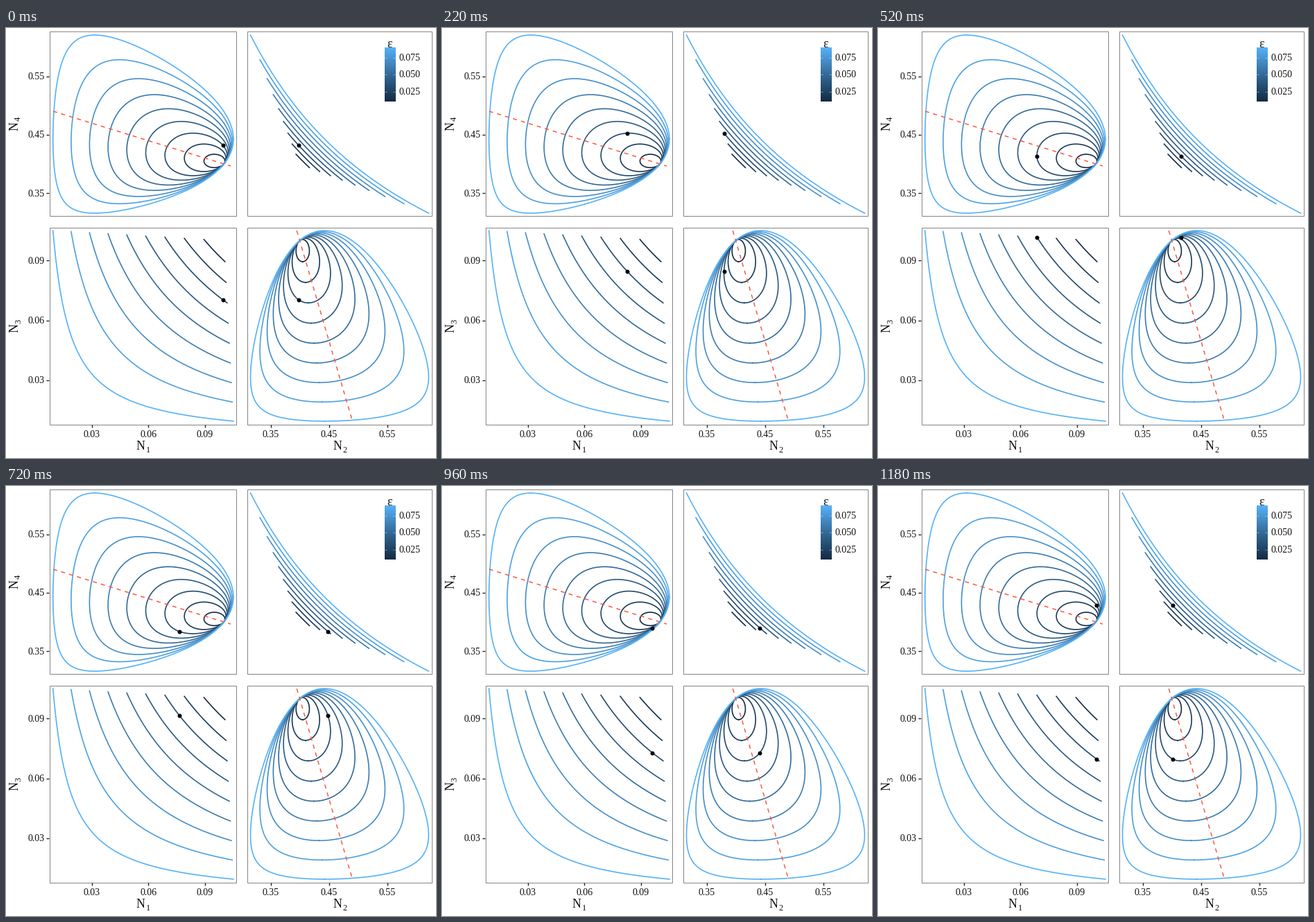
A matplotlib script that plays this animation: 620 px wide and 620 px high, repeating every 1200 ms.

```python
import matplotlib.pyplot as plt
import numpy as np
from matplotlib.animation import FuncAnimation
from matplotlib.colors import LinearSegmentedColormap
from matplotlib.patches import Rectangle

SIZE = 620
FRAMES = 60
PT = 0.72  # points per pixel at 100 dpi
PHASE = 4.5  # steps elapsed since N1 was at its maximum
BLUES = LinearSegmentedColormap.from_list("blues", ["#132b43", "#336a98", "#56b1f7"])

plt.rcParams["font.family"] = "Liberation Serif"
fig = plt.figure(figsize=(SIZE / 100, SIZE / 100), dpi=100, facecolor="white")
ax = fig.add_axes([0, 0, 1, 1])
ax.axis("off")


# Population sizes to stage pixels
def x1(n):
    return 123.5 + 2723 * (n - 0.03)


def x2(n):
    return 381.5 + 840 * (n - 0.35)


def y3(n):
    return 508 - 2877 * (n - 0.03)


def y4(n):
    return 70 + 840 * (0.55 - n)


def orbit(eps, theta):
    """Closed orbit of the cyclic four-species system, N1*N3 and N2*N4 constant.

    Returns the four populations and the time density along theta.
    """
    c = np.sqrt(0.1 * (0.1 - eps))
    d = np.sqrt(0.4 * (0.4 + eps))
    energy = 1 - 2 * c - 2 * d
    u = 2 * np.arcsinh(np.sqrt(energy / (4 * c)) * np.cos(theta))
    v = -2 * np.arcsinh(np.sqrt(energy / (4 * d)) * np.sin(theta))
    pops = c * np.exp(u), d * np.exp(v), c * np.exp(-u), d * np.exp(-v)
    return pops, 1 / (np.cosh(u / 2) * np.cosh(v / 2))


def panels(n1, n2, n3, n4):
    """Pixel positions of one state in each of the four panels."""
    return ((x1(n1), y4(n4)), (x2(n2), y4(n4)),
            (x1(n1), y3(n3)), (x2(n2), y3(n3)))


def line(xs, ys, color, width, **kw):
    return ax.plot(xs, ys, color=color, lw=width * PT, **kw)[0]


def label(x, y, text, size=14, **kw):
    ax.text(x, y, text, fontsize=size * PT, color="#111111", va="baseline", **kw)


def title(x, y, index, upright):
    """Axis title: an N with a subscript, starting at x, y on its baseline."""
    if upright:
        label(x, y, "N", 18)
        label(x + 13.5, y + 3, index, 12.5)
    else:
        turned = dict(rotation=90, rotation_mode="anchor", ha="left")
        label(x, y, "N", 18, **turned)
        label(x + 3, y - 13.5, index, 12.5, **turned)


def draw_frame():
    for x, w in ((62.5, 269), (347.5, 266)):
        for y, h in ((4.5, 266), (287.5, 284)):
            ax.add_patch(Rectangle((x, y), w, h, fill=False, ec="#858585", lw=PT))
    for to_x, values in ((x1, (0.03, 0.06, 0.09)), (x2, (0.35, 0.45, 0.55))):
        for n in values:
            line([to_x(n)] * 2, [572, 576], "#222222", 1.4, solid_capstyle="butt")
            label(to_x(n), 590.5, f"{n:.2f}", ha="center")
    for to_y, values in ((y3, (0.03, 0.06, 0.09)), (y4, (0.35, 0.45, 0.55))):
        for n in values:
            line([58, 62], [to_y(n)] * 2, "#222222", 1.4, solid_capstyle="butt")
            label(55.5, to_y(n) + 4.5, f"{n:.2f}", ha="right")
    title(188, 608.5, "1", True)
    title(472, 608.5, "2", True)
    title(18, 439, "3", False)
    title(18, 147.5, "4", False)


def draw_curves():
    loop = np.linspace(0, 2 * np.pi, 721)
    # N2-N4 and N1-N3 trace an arc back and forth, so half a turn covers it
    spans = loop, loop[180:541], loop[:361], loop
    for eps in np.arange(1, 10) / 100:
        for i, theta in enumerate(spans):
            xs, ys = panels(*orbit(eps, theta)[0])[i]
            line(xs, ys, BLUES((eps - 0.01) / 0.08), 1.65)
    # Equilibria: N1 = N3, N2 = N4, N1 + N2 = 1/2
    red = dict(color="#f9583c", width=1.5, dashes=(4, 4), dash_capstyle="butt")
    a = np.array([0.0096, 0.1036])
    line(x1(a), y4(0.5 - a), **red)
    b = np.array([0.105, 0.0109])
    line(x2(0.5 - b), y3(b), **red)


def draw_legend():
    ramp = np.linspace(1, 0, 256)[:, None]
    ax.imshow(ramp, cmap=BLUES, extent=(545.5, 561, 106.5, 29), aspect="auto",
              interpolation="bilinear")
    for n, y in ((0.075, 42.5), (0.05, 67), (0.025, 91.5)):
        for x in (545.5, 558):
            line([x, x + 3], [y, y], "white", 0.6, alpha=0.7, solid_capstyle="butt")
        label(566.5, y + 4.4, f"{n:.3f}")
    label(549.5, 28, "\u03b5", 18)


draw_frame()
draw_curves()
draw_legend()
ax.set_xlim(0, SIZE)
ax.set_ylim(SIZE, 0)

# Elapsed share of the period along the orbit of the moving state
turn = np.linspace(0, 2 * np.pi, 2001)
density = orbit(0.03, turn)[1]
clock = np.concatenate([[0], np.cumsum((density[1:] + density[:-1]) / 2)])
clock /= clock[-1]

dots, = ax.plot([], [], "o", color="black", ms=6 * PT, mew=0, zorder=5)


def update(k):
    theta = np.interp((k + PHASE) / FRAMES % 1, clock, turn)
    xs, ys = zip(*panels(*orbit(0.03, theta)[0]))
    dots.set_data(xs, ys)
    return dots,


anim = FuncAnimation(fig, update, frames=FRAMES, interval=20, repeat=True,
                     repeat_delay=0, blit=False)
plt.show()
```
